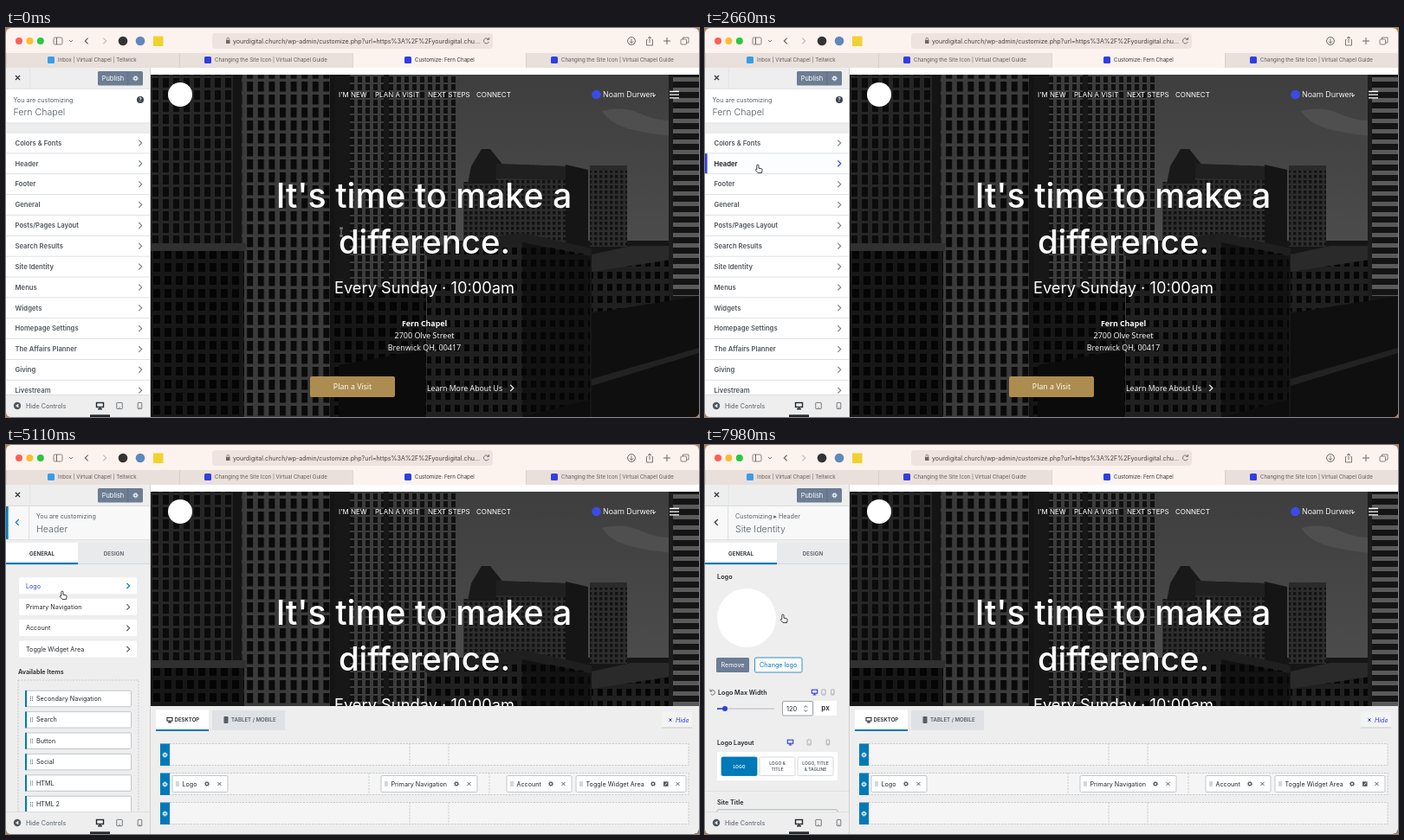
Write an HTML page that moves like this. It is 800x450 px and loops after 8000 ms.

```html
<!DOCTYPE html>
<html lang="en">
<head>
<meta charset="utf-8">
<title>Site customizer</title>
<style>
  html, body { margin: 0; width: 100%; height: 100%; overflow: hidden; background: #c9803f; }
  svg { display: block; width: 100vw; height: 100vh; font-family: Inter, Roboto, sans-serif; }
  .page { font-family: "Open Sans", "Noto Sans", sans-serif; }
</style>
</head>
<body>
<svg id="stage" viewBox="0 0 800 450" preserveAspectRatio="none"></svg>
<script>
const LOOP = 8000, STEP = 70;
const BLUE = '#2f3fe0', WP = '#0079b8', INK = '#23282d', GREY = '#555d66', SLATE = '#6c7d94', PANEL = '#eeeeee', CHROME = '#fcf2ee';
const MID = 'text-anchor="middle"', BOLD = 'font-weight="600"', MIDBOLD = MID + ' ' + BOLD, LIGHT = 'font-weight="300"';

// Drawing helpers; text is placed by its vertical centre.
const rect = (x, y, w, h, fill, more = '') =>
  `<rect x="${x}" y="${y}" width="${w}" height="${h}" fill="${fill}" ${more}/>`;
const box = (x, y, w, h, fill, stroke, more = '') => rect(x, y, w, h, fill, `stroke="${stroke}" stroke-width=".8" ${more}`);
const text = (x, y, label, size, fill, more = '') =>
  `<text x="${x}" y="${y + size * .36}" font-size="${size}" fill="${fill}" ${more}>${label.replace(/&/g, '&amp;')}</text>`;
const line = (d, stroke, width = 1, more = '') =>
  `<path d="${d}" fill="none" stroke="${stroke}" stroke-width="${width}" ${more}/>`;
const disc = (x, y, r, fill, more = '') => `<circle cx="${x}" cy="${y}" r="${r}" fill="${fill}" ${more}/>`;
const group = (id, body, more = '') => `<g id="${id}" ${more}>${body}</g>`;
const dashed = (x, y, w, h, fill = 'none') => box(x, y, w, h, fill, '#b9bec3', 'stroke-dasharray="2 1.5"');
const chevron = (x, y, dir, color, s = 3.4, more = '') =>
  line(`M${x - dir * s / 2} ${y - s}l${dir * s} ${s}l${-dir * s} ${s}`, color, 1.2, more);
const down = (x, y, color) => line(`M${x - 2} ${y - 1}l2 2l2 -2`, color, .9);
const cross = (x, y, s, color, width = 1) =>
  line(`M${x - s} ${y - s}l${2 * s} ${2 * s}m0 ${-2 * s}l${-2 * s} ${2 * s}`, color, width);
const gear = (x, y, color) =>
  disc(x, y, 1.7, 'none', `stroke="${color}" stroke-width="1.2"`) +
  disc(x, y, 2.7, 'none', `stroke="${color}" stroke-width=".9" stroke-dasharray="1.05 1.07"`);
const dots = (x, y) => line(`M${x} ${y - 2.5}v5m2 -5v5`, GREY, 1, 'stroke-dasharray="1 1"');
const monitor = (x, y, color, s = 1) =>
  `<g transform="translate(${x} ${y}) scale(${s})">` + box(-4, -3.5, 8, 5, 'none', color, 'style="stroke-width:1.4"') +
  line('M0 1.5v2.2M-2.4 3.8h4.8', color, 1.4) + '</g>';
const device = (x, y, w, color, s = 1) =>
  box(x - w * s / 2, y - 3.6 * s, w * s, 7.2 * s, 'none', color, 'rx=".6"') + line(`M${x - .7} ${y + 2.2 * s}h1.4`, color, .8);
const devices = (x, y, gap) => monitor(x, y, BLUE, .8) + device(x + gap, y, 5, '#9a9fa5', .85) + device(x + 2 * gap, y, 4, '#9a9fa5', .85);

function browser() {
  const tab = (i, label, x, color) =>
    rect(i * 200, 29, 200, 17, i === 2 ? CHROME : '#e9dfdb') + rect(i * 200, 29, .7, 17, '#d5c9c4') +
    rect(x - 4, 33, 8, 8, color, 'rx="1.5"') + text(x + 8, 37, label, 6.1, i === 2 ? '#333' : '#615c56');
  const guide = 'Changing the Site Icon | Virtual Chapel Guide';
  const ink = '#6d6661';
  return rect(0, 0, 800, 46, CHROME) +
    ['#fe5f57', '#febc2e', '#28c840'].map((c, i) => disc(15 + i * 12.4, 15, 4, c)).join('') +
    box(55, 11, 10, 8, 'none', ink, 'rx="1.5"') + line('M58.5 11v8', ink) + down(75, 15, ink) +
    chevron(93, 15, -1, ink) + chevron(114, 15, 1, '#c5bcb8') +
    disc(135, 15, 5.3, '#333') + disc(155, 15, 5.3, '#5f88bd') + rect(170, 9.5, 11.5, 11.5, '#f1d22d') +
    rect(238, 6, 324, 18, '#eee3df', 'rx="4"') + rect(254, 14, 4.5, 4, ink) + line('M255 14v-1.4a1.3 1.3 0 0 1 2.6 0v1.4', ink, .8) +
    text(262, 15, 'yourdigital.church/wp-admin/customize.php?url=https%3A%2F%2Fyourdigital.chu…', 7.1, '#46423d') +
    line('M557 13.2a3 3 0 1 0 .3 2.8M557.6 11v2.4h-2.4', ink, .9) +
    disc(722, 15, 4.4, 'none', `stroke="${ink}"`) + line('M722 12.5v5m-2-2l2 2l2-2', ink, .9) +
    line('M740.5 13.5h-1v6.5h7v-6.5h-1M743 17v-7m-2 2l2-2l2 2', ink, .9) +
    line('M763 11v8m-4-4h8', ink) + box(779, 13, 6.5, 6, 'none', ink, 'rx="1"') + line('M781.5 13v-2h6.5v6h-2', ink, .8) +
    tab(0, 'Inbox | Virtual Chapel | Tellwick', 52, '#3b9be8') + tab(1, guide, 233, BLUE) +
    tab(2, 'Customize: Fern Chapel', 464, BLUE) + tab(3, guide, 633, BLUE);
}

// Facade patterns: cell size, window size, wall and window tones.
const facades = {
  leftFace: [12, 14, 7, 11, '#262626', '#0b0b0b'], tower: [12.6, 15, 7, 11.5, '#3b3b3b', '#0a0a0a'],
  slab: [9, 9, 5, 7.5, '#3c3c3c', '#101010'], hotel: [6, 6, 3.4, 3.6, '#2d2d2d', '#121212'],
  block: [13, 15, 8, 10, '#171717', '#050505'], brick: [11, 14, 6, 8, '#202020', '#060606'],
  edge: [32, 12, 32, 7, '#5a5a5a', '#141414']
};
const pattern = ([id, [w, h, ww, wh, wall, glass]]) =>
  `<pattern id="${id}" width="${w}" height="${h}" patternUnits="userSpaceOnUse">${rect(0, 0, w, h, wall)}${rect(1, 2, ww, wh, glass)}</pattern>`;

function skyline() {
  const facade = (id, d) => `<path d="${d}" fill="url(#${id})"/>`;
  const flat = (d, fill) => `<path d="${d}" fill="${fill}"/>`;
  return rect(167, 54, 633, 396, 'url(#sky)') +
    flat('M688 96q24 -6 44 3t36 8v18q-36 -4 -54 -10t-26 -19', '#4f4f4f') +
    flat('M519 246h281v204H519z', '#161616') +
    facade('slab', 'M379 310V54h140v256z') + flat('M379 54h18v256h-18zM436 54h6v246h-6z', '#171717') +
    facade('hotel', 'M674 163h43v90h-43z') + flat('M674 159h43v6h-43z', '#2a2a2a') +
    facade('hotel', 'M528 178h40v82h-40z') + flat('M533 180l4 -20l12 -20h10l16 20v20z', '#191919') +
    facade('hotel', 'M566 157l82 3v104l-82 -12z') + flat('M566 157l82 3v16l-82 -2z', '#202020') + flat('M646 158l26 6v108l-26 -8z', '#151515') +
    flat('M676 262l46 -10h46v40h-92z', '#2a2a2a') + facade('brick', 'M676 282l92 -14v60h-92z') +
    facade('leftFace', 'M167 54h95v200h-95z') +
    facade('tower', 'M270 54h109v396H270z') + flat('M262 54h10v396h-10zM374 54h6v396h-6z', '#141414') +
    facade('block', 'M379 300h106v150H379z') +
    flat('M167 249h110v9H167z', '#303030') + facade('block', 'M167 258h108v192H167z') +
    flat('M384 390l100 -18v78H384z', '#0b0b0b') +
    facade('brick', 'M486 254l110 -14l78 18v172l-78 20H486z') + flat('M484 254l112 -17l80 18v8l-80 -15l-112 15z', '#1f1f1f') +
    flat('M596 248l78 16v186h-78z', '#06060688') +
    facade('edge', 'M768 54h32v256h-32z') + flat('M765 54h5v256h-5z', '#1c1c1c') +
    flat('M676 330l124 -20v140H676z', '#0f0f0f') + flat('M676 406l124 -36v6l-124 38z', '#222');
}

function hero() {
  const nav = [["I'M NEW", 384], ['PLAN A VISIT', 426], ['NEXT STEPS', 487], ['CONNECT', 543]];
  const white = '#fff';
  return rect(167, 46, 633, 8, white) + skyline() + disc(201, 77, 14, white) +
    nav.map(([s, x]) => text(x, 77, s, 8, white)).join('') +
    disc(681.5, 77, 5.3, '#3c4be6') + down(748, 78, white) + line('M766 73.5h11m-11 3.7h11m-11 3.7h11', white, 1.3) +
    text(482.5, 194, "It's time to make a", 39.3, white, MID + ' font-weight="500"') +
    text(483, 247, 'difference.', 38.3, white, MID + ' font-weight="500"') +
    text(483, 300, 'Every Sunday · 10:00am', 18.3, white, MID) +
    rect(351, 403, 98, 24, '#ad8c50', 'rx="2"') + chevron(584, 416.5, 1, white, 3.6) +
    group('copy', text(689, 77, 'Noam Durwen', 8.8, white) +
      text(483, 342, 'Fern Chapel', 8.8, white, MID + ' font-weight="700"') +
      text(483, 356, '2700 Olve Street', 9, white, MID) + text(483, 370, 'Brenwick QH, 00417', 9, white, MID) +
      text(400, 415, 'Plan a Visit', 8.8, white, MID) + text(486, 417, 'Learn More About Us', 8.8, white), 'class="page"');
}

function builder() {
  const chip = (x, w, label, extra) => box(x, 382.5, w, 19, '#fff', '#b3bac2', 'rx="1.5"') + dots(x + 5, 392) +
    text(x + 11.5, 392, label, 7.2, INK) + gear(x + w - (extra ? 38 : 24), 392, GREY) +
    (extra ? rect(x + w - 26, 389.3, 5.6, 5.6, GREY) + line(`M${x + w - 24.5} 393.5l2.8 -2.8`, '#fff', .8) : '') +
    cross(x + w - 9.5, 392, 2, GREY);
  const row = (y, a, b) => dashed(189, y, 599, 25, '#f5f5f5') + line(`M${a} ${y}v25M${b} ${y}v25`, '#b9bec3', .8, 'stroke-dasharray="2 1.5"') +
    rect(178, y, 11, 25.5, WP) + gear(183.5, y + 13, '#fff');
  return rect(167, 302, 633, 148, PANEL) + rect(173, 306, 61, 25, '#fff') + rect(173, 329, 61, 2, WP) +
    monitor(189, 318, INK, .75) + text(194.5, 318, 'DESKTOP', 6.1, INK, BOLD) +
    rect(238, 307, 84, 23, '#dfe1e4') + rect(251.5, 314, 5, 8, GREY, 'rx="1"') + text(260, 318, 'TABLET / MOBILE', 6.1, GREY, BOLD) +
    rect(757, 309, 35, 18, '#f3f3f3') + rect(757, 326.5, 35, 1, '#c5c9ce') +
    cross(767, 318, 1.6, BLUE) + text(773, 318, 'Hide', 7.2, BLUE, 'font-style="italic"') +
    row(345.5, 466, 511) + row(379.5, 419, 558) + row(413.5, 466, 511) +
    chip(192, 64, 'Logo') + chip(433, 111, 'Primary Navigation') + chip(578, 75, 'Account') + chip(658, 127, 'Toggle Widget Area', true);
}

const sections = ['Colors & Fonts', 'Header', 'Footer', 'General', 'Posts/Pages Layout', 'Search Results', 'Site Identity',
  'Menus', 'Widgets', 'Homepage Settings', 'The Affairs Planner', 'Giving', 'Livestream'];

function mainPanel() {
  return rect(0, 70, 166, 354, PANEL) + rect(0, 70, 166, 40, '#fff') + rect(0, 109.5, 166, .8, '#d8dadd') +
    text(8.5, 83, 'You are customizing', 7.2, GREY) + text(8.5, 97, 'Fern Chapel', 10.6, GREY, LIGHT) +
    disc(155, 83, 4, '#3c434a') + text(155, 83, '?', 6.5, '#fff', MIDBOLD) +
    rect(0, 121, 166, 303, '#fff') + rect(0, 120.7, 166, .8, '#d8dadd') +
    sections.map((label, i) => {
      const y = 133 + i * 23.85;
      return rect(0, y + 11.5, 166, .8, '#d8dadd') +
        group('bar' + i, rect(0, y - 11.6, 166, 23, '#5b6cff', 'opacity=".015"') + rect(0, y - 11.6, 2.6, 23, BLUE), 'opacity="0"') +
        text(10.5, y, label, 7.7, '#50565d', BOLD + ` id="name${i}"`) + chevron(155, y, 1, '#7c838a', 3.4, `id="go${i}"`);
    }).join('');
}

const panelHead = (prefix, over, title) =>
  rect(0, 70, 166, 354, PANEL) + rect(0, 70, 166, 40, '#f8f8f8') + rect(0, 70, 166, .8, '#d8dadd') + rect(0, 109.3, 166, .8, '#d8dadd') +
  rect(26.3, 70, .8, 40, '#d8dadd') + rect(0, 71, 2.6, 38, WP, `id="${prefix}Focus" opacity="0"`) +
  chevron(13, 89.5, -1, INK, 3.4, `id="${prefix}Back"`) +
  text(35, 82.5, over, 7.2, GREY) + text(35, 97, title, 10.6, GREY, LIGHT) +
  rect(0, 113, 83, 25, '#fff') + rect(83, 113, 83, 25, '#e9eaec') + rect(83, 137, 83, .8, '#d0d3d6') + rect(0, 136, 83, 2.2, WP) +
  text(41.5, 125.5, 'GENERAL', 6.2, INK, MIDBOLD) + text(124.5, 125.5, 'DESIGN', 6.2, GREY, MIDBOLD);

function headerPanel() {
  const links = ['Logo', 'Primary Navigation', 'Account', 'Toggle Widget Area'];
  const items = ['Secondary Navigation', 'Search', 'Button', 'Social', 'HTML', 'HTML 2'];
  return panelHead('head', 'You are customizing', 'Header') +
    links.map((s, i) => rect(15, 153.3 + i * 24.4, 136, 19, '#fff', 'rx="1"') +
      text(23, 163 + i * 24.4, s, 7.2, INK, `id="link${i}"`) + chevron(141, 163 + i * 24.4, 1, GREY, 3.2, `id="arrow${i}"`)).join('') +
    text(14, 262, 'Available Items', 7.2, INK, BOLD) + dashed(14, 272, 139, 170) +
    items.map((s, i) => {
      const y = 293.5 + i * 24.4;
      return box(22.5, y - 9.3, 122, 18.5, '#fff', '#b3bac2', 'rx="1"') + rect(22, y - 9.5, 2, 19, WP) + dots(28.5, y) + text(35, y, s, 7.2, INK);
    }).join('');
}

function identityPanel() {
  const choice = (x, lines, on) => box(x, 361, 41, 21.5, on ? WP : '#fff', on ? WP : '#ccd0d4', 'rx="1.5"') +
    lines.map((s, i) => text(x + 20.5, 371.7 + (i - (lines.length - 1) / 2) * 6.4, s, 5, on ? '#fff' : GREY, MIDBOLD)).join('');
  return panelHead('site', 'Customizing ▸ Header', 'Site Identity') +
    text(14, 152, 'Logo', 7.3, INK, BOLD) + disc(48, 200, 34, '#fff') +
    rect(13, 246, 38, 17, SLATE, 'rx="1.5"') + text(32, 254.5, 'Remove', 7.1, '#fff', MID) +
    box(57.5, 246, 54.5, 17, '#fbfbfb', WP, 'rx="1.5"') + text(84.7, 254.5, 'Change logo', 7.2, WP, MID) +
    line('M6.5 284.5a2.8 2.8 0 1 1 0 3.6M6 282.5v2.5h2.4', GREY, .9) + text(15, 286, 'Logo Max Width', 7.2, INK, BOLD) + devices(126.5, 286, 10.4) +
    rect(14, 304.3, 66, 1.6, '#c9cdd2') + rect(14, 304.3, 9, 1.6, BLUE) + disc(23, 305, 3, BLUE) +
    box(89.5, 296.5, 35, 16.5, '#fff', '#8c9197', 'rx="1.5"') + text(94, 305, '120', 7.4, INK) +
    line('M114.5 303.5l1.8 -2l1.8 2m0 3l-1.8 2l-1.8 -2', GREY, .9) +
    rect(126, 296, 26, 17, '#fff') + text(139, 304.5, 'px', 8, INK, MIDBOLD) +
    text(14, 344, 'Logo Layout', 7.2, INK, BOLD) + devices(98.5, 344, 21.7) +
    rect(14, 355, 139, 33, '#fff') + choice(19, ['LOGO'], true) + choice(63, ['LOGO &', 'TITLE']) + choice(107, ['LOGO, TITLE', '& TAGLINE']) +
    rect(0, 400, 166, .8, '#dadcdf') + text(14, 413, 'Site Title', 7.2, INK, BOLD) + box(14, 422, 139, 18, '#fff', '#8c9197', 'rx="1.5"');
}

function sidebarFrame() {
  return rect(0, 46, 166.5, 24.3, PANEL) + rect(0, 69.8, 166.5, .8, '#d8dadd') + cross(13.5, 57.5, 2.6, INK, 1.3) + rect(27, 46, .7, 24, '#dddfe1') +
    rect(106, 50, 52, 16.5, SLATE, 'rx="1.5"') + rect(140.5, 50, .7, 16.5, '#596a80') +
    text(123.5, 58, 'Publish', 7.4, '#fff', MID) + gear(149.5, 58.3, '#fff') +
    rect(0, 424, 166.5, 26, PANEL) + rect(0, 424, 166.5, .8, '#d8dadd') + rect(166, 46, .8, 404, '#d0d2d5') +
    disc(13, 437, 4.2, '#50565d') + `<path d="M14.3 434.8v4.4l-3.2 -2.2z" fill="#fff"/>` + text(23, 437, 'Hide Controls', 7.2, GREY) +
    monitor(108.5, 437, INK) + rect(97, 447.3, 23, 2.7, INK) + device(131, 437, 6.5, GREY) + device(154.5, 437, 4.6, GREY);
}

const beam = 'M-1.8 -4.5q1.8 0 1.8 1.2v6.6q0 1.2 -1.8 1.2M1.8 -4.5q-1.8 0 -1.8 1.2v6.6q0 1.2 1.8 1.2';
const cursors =
  group('ibeam', line(beam, '#ddd', 1.8) + line(beam, '#111', .8)) +
  group('arrow', `<path d="M0 0v10l2.4 -2.2l1.6 3.6l1.6 -.7l-1.6 -3.5h3.2z" fill="#111" stroke="#fff" stroke-width=".8"/>`) +
  group('hand', `<path d="M-1.2 4.6V.2a1.1 1.1 0 0 1 2.2 0V3.2l3.2 .6q1.1 .3 .9 1.5l-.6 3.3h-4.4l-3 -3.4q.5 -1.2 1.7 -.6z" fill="#fff" stroke="#111" stroke-width=".8" stroke-linejoin="round"/>`);

const stage = document.getElementById('stage');
stage.innerHTML = `<defs>${Object.entries(facades).map(pattern).join('')}
  <linearGradient id="sky" x2="0" y2="1"><stop stop-color="#3e3e3e"/><stop offset=".5" stop-color="#4c4c4c"/><stop offset="1" stop-color="#222"/></linearGradient>
  <clipPath id="window">${rect(0, 0, 800, 450, '#000', 'rx="6"')}</clipPath>
  <clipPath id="drawer">${rect(0, 70, 166, 354, '#000')}</clipPath></defs>` +
  group('app', browser() + hero() + group('builder', builder()) + rect(0, 46, 166.5, 404, PANEL) +
    group('panels', group('main', mainPanel()) + group('header', headerPanel()) + group('identity', identityPanel()), 'clip-path="url(#drawer)"') +
    sidebarFrame() + disc(0, 0, 11, '#dfeaff88', 'id="ring" stroke="#86a9e6" stroke-width="1.8"') + group('cursor', cursors), 'clip-path="url(#window)"');

const $ = id => document.getElementById(id);
const set = (id, name, value) => $(id).setAttribute(name, value);
const show = (id, on) => set(id, 'visibility', on ? 'visible' : 'hidden');
const ramp = (t, start, length) => Math.min(1, Math.max(0, (t - start) / length));
const ease = u => u * u * (3 - 2 * u);

// Pointer stops: time, x, y.
const route = [[0, 387, 236], [1120, 387, 236], [1610, 60, 132], [1680, 60, 153], [2100, 60, 154], [2450, 61, 159], [2800, 61, 159],
  [3150, 62, 163], [4480, 62, 163], [4830, 65, 170], [5110, 65, 170], [5600, 71, 166], [7070, 71, 166], [7560, 90, 197], [LOOP, 90, 197]];
function pointer(t) {
  const i = route.findIndex(stop => stop[0] > t);
  const [t0, x0, y0] = route[i - 1], [t1, x1, y1] = route[i];
  const u = ease((t - t0) / (t1 - t0));
  return [x0 + (x1 - x0) * u, y0 + (y1 - y0) * u];
}

function draw(now) {
  const t = Math.floor((now % LOOP) / STEP) * STEP;
  const [x, y] = pointer(t);

  const glow = [ramp(t, 1540, 70) * (1 - ramp(t, 1640, 150)), ramp(t, 1640, 150)];
  const pointed = [t >= 1610 && t < 1680, t >= 1680];
  glow.forEach((g, i) => {
    set('bar' + i, 'opacity', g);
    set('name' + i, 'fill', g > .5 ? '#16181c' : '#50565d');
    set('go' + i, 'stroke', pointed[i] ? BLUE : '#7c838a');
  });

  const toHeader = ease(ramp(t, 3657, 180)), toIdentity = ease(ramp(t, 6400, 180));
  set('main', 'transform', `translate(${-167 * toHeader})`);
  set('header', 'transform', `translate(${167 * (1 - toHeader - toIdentity)})`);
  set('identity', 'transform', `translate(${167 * (1 - toIdentity)})`);
  show('builder', t >= 3710);

  const focused = t >= 3850 && t < 6230;
  set('headFocus', 'opacity', t < 3850 ? 0 : 1 - ramp(t, 6190, 150));
  set('headBack', 'stroke', focused ? WP : INK);
  set('link0', 'fill', focused ? BLUE : INK);
  set('arrow0', 'stroke', t >= 3850 ? WP : GREY);

  const overPage = x > 167;
  show('ibeam', t <= 1120);
  show('arrow', overPage && t > 1120);
  show('hand', !overPage);
  set('cursor', 'transform', `translate(${x} ${y})`);
  set('ring', 'transform', `translate(${x} ${y})`);
  show('ring', (t >= 3220 && t < 3430) || (t >= 6230 && t < 6440));
}

const start = performance.now();
function tick() {
  draw(performance.now() - start);
  requestAnimationFrame(tick);
}
tick();
</script>
</body>
</html>
```
